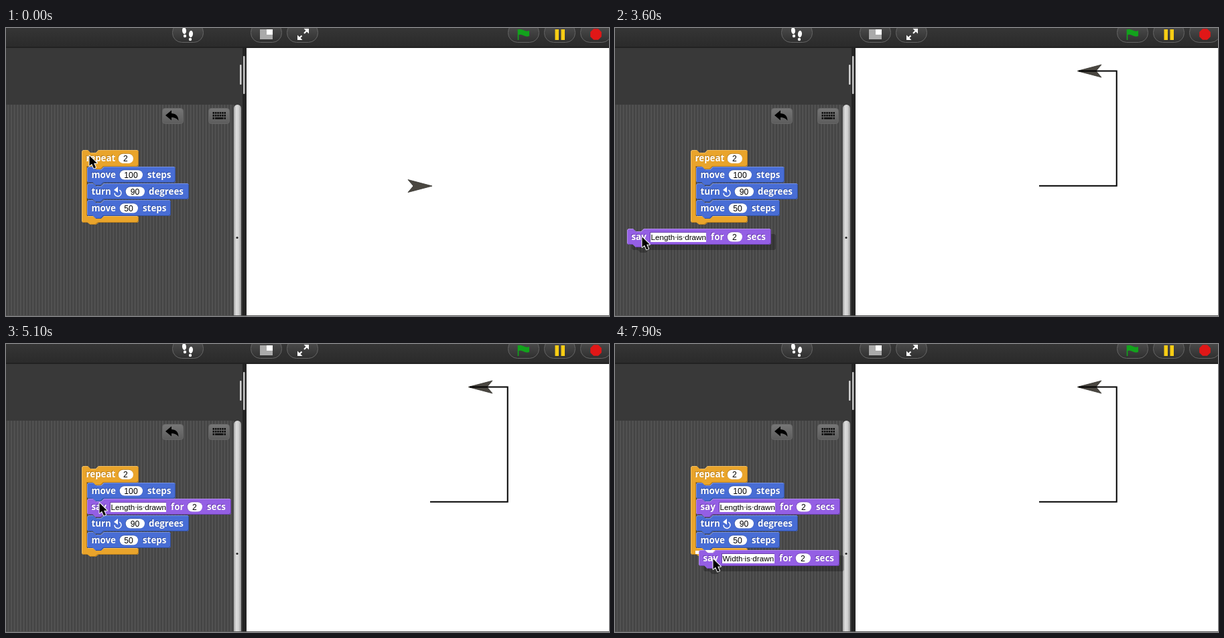
Recreate the animation shown at these times as an HTML page with a canvas. Size 900 by 432 pixels, loop 8 s.

```html
<!DOCTYPE html>
<html lang="en">
<head>
<meta charset="utf-8">
<title>Block script</title>
<style>
html, body { margin: 0; width: 900px; height: 432px; overflow: hidden; background: #333; }
canvas { display: block; }
</style>
</head>
<body>
<canvas id="view" width="900" height="432"></canvas>
<script>
const ctx = document.getElementById('view').getContext('2d');
const LOOP = 8000, STEP = 100;
const LABEL = '700 13.3px "Open Sans", "Noto Sans", sans-serif';
const INPUT = '11.7px "Liberation Sans", Arial, sans-serif';
const NUMBER = '12.2px "Liberation Sans", Arial, sans-serif';

const GOLD = { base: '#e9a42b', light: '#f3bd5c', dark: '#b67d1c' };
const BLUE = { base: '#486dd5', light: '#7691e2', dark: '#33509f' };
const PURPLE = { base: '#945fe4', light: '#b48df0', dark: '#6a3fae' };

// Block parts: [kind, x, text, width]
const REPEAT = { w: 85, skin: GOLD, parts: [['label', 6.5, 'repeat'], ['num', 54, '2', 23]] };
const MOVE100 = { w: 132, skin: BLUE, parts: [['label', 6.5, 'move'], ['num', 48, '100', 35], ['label', 90, 'steps']] };
const TURN = { w: 152, skin: BLUE, parts: [['label', 6.5, 'turn'], ['turn', 46], ['num', 57, '90', 29], ['label', 92, 'degrees']] };
const MOVE50 = { w: 125, skin: BLUE, parts: [['label', 6.5, 'move'], ['num', 48, '50', 28], ['label', 83, 'steps']] };
const say = (text, boxW) => ({
  w: boxW + 131, skin: PURPLE,
  parts: [['label', 6.5, 'say'], ['text', 34, text, boxW], ['label', boxW + 41, 'for'],
          ['num', boxW + 65, '2', 23], ['label', boxW + 95, 'secs']]
});
const SAY_LENGTH = say('Length is drawn', 84);
const SAY_WIDTH = say('Width is drawn', 79);

// Tracks: [time, x, y]
const POINTER = [
  [0, 124, 191], [2700, 124, 191], [2900, 20, 230], [3000, -30, 250], [3200, -30, 290],
  [3400, 10, 320], [3600, 40, 313], [3700, 42, 314], [4000, 118, 262], [4200, 139, 238],
  [6300, 139, 238], [6400, 60, 290], [6500, -20, 320], [6600, -10, 350], [6700, 26, 364],
  [6800, 60, 379], [7000, 193, 344], [7200, 154, 327], [7900, 146, 322]
];
const DRAG_LENGTH = [
  [3100, -240, 300], [3300, -120, 307], [3500, 5, 305], [3600, 18, 301],
  [3700, 20, 302], [4000, 98, 252], [4200, 121, 233], [4700, 121, 233]
];
const DRAG_WIDTH = [
  [6500, -260, 290], [6700, -164, 321], [6800, 20, 368], [7000, 171, 330],
  [7200, 132, 313], [7900, 125, 309], [8000, 125, 309]
];
const RUN = { start: 300, corner: 400, end: 500 }, DROP = 4700;

function at(track, t) {
  const i = track.findIndex(k => k[0] > t);
  if (i < 0) return track[track.length - 1].slice(1);
  if (i === 0) return track[0].slice(1);
  const [a, b] = [track[i - 1], track[i]];
  const u = (t - a[0]) / (b[0] - a[0]);
  return [a[1] + (b[1] - a[1]) * u, a[2] + (b[2] - a[2]) * u].map(Math.round);
}

function rect(x, y, w, h, fill) { ctx.fillStyle = fill; ctx.fillRect(x, y, w, h); }

function round(x, y, w, h, r, fill, stroke) {
  ctx.beginPath();
  ctx.roundRect(x, y, w, h, r);
  if (fill) { ctx.fillStyle = fill; ctx.fill(); }
  if (stroke) { ctx.strokeStyle = stroke; ctx.lineWidth = 1; ctx.stroke(); }
}

function poly(points, fill) {
  ctx.beginPath();
  points.forEach(p => ctx.lineTo(...p));
  ctx.closePath();
  if (fill) { ctx.fillStyle = fill; ctx.fill(); }
}

function fade(x0, y0, x1, y1, ...colors) {
  const g = ctx.createLinearGradient(x0, y0, x1, y1);
  colors.forEach((c, i) => g.addColorStop(i / (colors.length - 1), c));
  return g;
}

const notch = (x, y) => [[x + 9, y], [x + 13, y + 4], [x + 21, y + 4], [x + 25, y]];

function shape(points) {
  const p = new Path2D();
  points.forEach(q => p.lineTo(...q));
  p.closePath();
  return p;
}

function blockShape(x, y, w, h) {
  return shape([
    [x, y + 2], [x + 2, y], ...notch(x, y), [x + w - 2, y], [x + w, y + 2],
    [x + w, y + h - 2], [x + w - 2, y + h], ...notch(x, y + h).reverse(), [x + 2, y + h], [x, y + h - 2]
  ]);
}

function loopShape(x, y, w, base) {
  const head = y + 25, end = base + 10;
  return shape([
    [x, y + 2], [x + 2, y], ...notch(x, y), [x + w - 2, y], [x + w, y + 2],
    [x + w, head - 2], [x + w - 2, head], ...notch(x + 8, head).reverse(), [x + 8, head],
    [x + 8, base], [x + w - 2, base], [x + w, base + 2], [x + w, end - 2], [x + w - 2, end],
    ...notch(x, end).map(([px, py]) => [px, end + (py - end) * .75]).reverse(), [x + 2, end], [x, end - 2]
  ]);
}

function bevel(path, skin) {
  const moved = d => {
    const p = new Path2D();
    p.addPath(path, new DOMMatrix([1, 0, 0, 1, d, d]));
    return p;
  };
  ctx.save();
  ctx.fillStyle = skin.light;
  ctx.fill(path);
  ctx.clip(path);
  ctx.clip(moved(1));
  ctx.fillStyle = skin.dark;
  ctx.fill(path);
  ctx.clip(moved(-1));
  ctx.fillStyle = skin.base;
  ctx.fill(path);
  ctx.restore();
}

const draw = {
  label(x, y, text, w, skin) {
    ctx.font = LABEL;
    ctx.fillStyle = skin.dark;
    ctx.fillText(text, x - 1, y + 15.5);
    ctx.fillStyle = '#fff';
    ctx.fillText(text, x, y + 16.5);
  },
  num(x, y, text, w, skin) {
    round(x, y + 4.5, w, 15, 7.5, skin.dark);
    round(x + .7, y + 5.2, w - .7, 14.3, 7, '#fff');
    ctx.font = NUMBER;
    ctx.fillStyle = '#000';
    ctx.textAlign = 'center';
    ctx.fillText(text, x + w / 2, y + 16.5);
    ctx.textAlign = 'left';
  },
  text(x, y, text, w, skin) {
    rect(x, y + 5, w, 15, skin.dark);
    rect(x + 1, y + 6, w - 1, 14, '#fff');
    ctx.font = INPUT;
    ctx.fillStyle = '#000';
    ctx.fillText(text, x + 1.5, y + 16.5);
    [...text].forEach((c, i) => {
      if (c === ' ') rect(x + 2.5 + ctx.measureText(text.slice(0, i)).width, y + 12, 1.6, 1.6, '#777');
    });
  },
  turn(x, y) {
    ctx.strokeStyle = '#fff';
    ctx.lineWidth = 1.4;
    ctx.beginPath();
    ctx.arc(x, y + 14.5, 5, -1.1, Math.PI);
    ctx.stroke();
    poly([[x - 6, y + 10], [x, y + 5], [x, y + 14]], '#fff');
  }
};

function parts(block, x, y) {
  for (const [kind, dx, text, w] of block.parts) draw[kind](x + dx, y, text, w, block.skin);
}

function drawBlock(block, x, y, h = 24) {
  bevel(blockShape(x, y, block.w, h), block.skin);
  parts(block, x, y);
}

function dragBlock(block, x, y) {
  ctx.save();
  ctx.translate(7, 8);
  ctx.fillStyle = 'rgba(0,0,0,.26)';
  ctx.fill(blockShape(x, y, block.w, 24));
  ctx.restore();
  drawBlock(block, x, y);
}

function script(t) {
  const x = 113, y = 183, full = t >= DROP;
  const path = loopShape(x, y, REPEAT.w, full ? 306 : 282);
  const rows = full ? [[MOVE100, 208], [SAY_LENGTH, 232], [TURN, 257], [MOVE50, 282]]
                    : [[MOVE100, 208], [TURN, 233], [MOVE50, 258]];
  if (t >= RUN.start && t < RUN.end) {
    ctx.save();
    ctx.shadowColor = ctx.fillStyle = 'rgb(153,255,213)';
    ctx.shadowBlur = 11;
    for (let i = 0; i < 2; i++) {
      ctx.fill(path);
      rows.forEach(([b, top]) => ctx.fill(blockShape(x + 8, top, b.w, 24)));
    }
    ctx.restore();
  }
  bevel(path, REPEAT.skin);
  parts(REPEAT, x, y + .5);
  rows.slice().reverse().forEach(([b, top]) => drawBlock(b, x + 8, top));
}

function pill(x) {
  round(x + .5, -7.5, 46, 29, 14, fade(0, -6, 0, 21, '#505050', '#303030'), '#666');
}

function toolbar() {
  rect(0, 0, 900, 30, fade(0, 0, 0, 30, '#353535', '#2a2a2a'));
  rect(0, 28, 900, 2, '#222');
  [248, 365, 419, 749, 803, 857].forEach(pill);
  ctx.fillStyle = '#fff';
  for (const [x, y] of [[266, 4], [276, 9]]) {
    ctx.beginPath();
    ctx.ellipse(x, y, 3, 5, x < 270 ? -.1 : .1, 0, 7);
    ctx.ellipse(x + (x < 270 ? 1 : -1), y + 8, 2.2, 2.2, 0, 0, 7);
    ctx.fill();
  }
  rect(379, 2, 19, 15, '#aaa');
  rect(389, 2, 9, 8, '#fff');
  ctx.strokeStyle = '#fff';
  ctx.lineWidth = 2.2;
  ctx.beginPath();
  ctx.moveTo(437, 16); ctx.lineTo(441.5, 11.5);
  ctx.moveTo(445, 8); ctx.lineTo(449, 4);
  ctx.stroke();
  poly([[435, 18], [435, 10.5], [442.5, 18]], '#fff');
  poly([[452, 1], [444.5, 1], [452, 8.5]], '#fff');

  ctx.fillStyle = ctx.strokeStyle = '#12a31c';
  ctx.lineWidth = 1.6;
  ctx.beginPath();
  ctx.moveTo(764.5, 2); ctx.lineTo(764.5, 18);
  ctx.stroke();
  ctx.beginPath();
  ctx.moveTo(764, 3);
  ctx.bezierCurveTo(770, -1, 774, 7, 781, 4);
  ctx.lineTo(781, 12);
  ctx.bezierCurveTo(774, 15, 770, 7, 764, 11);
  ctx.fill();
  rect(819.5, 2, 5.5, 16, '#f8cd14');
  rect(828.5, 2, 5.5, 16, '#f8cd14');
  poly(Array.from({ length: 8 }, (_, i) => {
    const a = (i + .5) * Math.PI / 4;
    return [880.5 + 9 * Math.cos(a), 9.5 + 9 * Math.sin(a)];
  }), '#e01717');
}

function padButton(x) {
  round(x + .5, 120.5, 31, 23, 4, fade(0, 120, 0, 144, '#777', '#5c5c5c'), '#666');
}

function panels() {
  rect(0, 30, 359, 402, '#242424');
  rect(0, 30, 353, 85, '#393939');
  rect(0, 115, 353, 317, '#525252');
  for (let x = 0; x < 353; x += 4.613) rect(x, 115, 2.3, 317, '#444');
  rect(340, 115, 13, 317, '#383838');
  round(340, 115, 11, 330, [6, 6, 0, 0], fade(340, 0, 351, 0, '#a4a4a4', '#dedede', '#cfcfcf', '#959595'));
  ctx.fillStyle = '#222';
  ctx.beginPath();
  ctx.arc(345, 314.5, 1.6, 0, 7);
  ctx.fill();
  round(349, 55, 2.5, 30, 1, '#d0d0d0');
  round(354, 42, 2.5, 57, 1, '#c8c8c8');

  padButton(233);
  poly([[238, 131], [247, 123.5], [247, 138.5]], '#000');
  ctx.beginPath();
  ctx.moveTo(246, 128);
  ctx.quadraticCurveTo(257, 128, 257.5, 139);
  ctx.quadraticCurveTo(254, 134, 246, 134);
  ctx.fill();
  padButton(302);
  for (let r = 0; r < 2; r++)
    for (let i = 0; i < 6; i++) rect(308.5 + i * 3.4, 126 + r * 4, 2.5, 2.8, '#111');
  rect(308.5, 134, 2.5, 2.8, '#111');
  rect(312, 134, 12.5, 2.8, '#111');
  rect(325.5, 134, 2.5, 2.8, '#111');
}

function sprite(x, y, angle) {
  ctx.save();
  ctx.translate(x, y);
  ctx.rotate(angle);
  poly([[0, 0], [-36, -9.5], [-28, 0], [-36, 9.5]], '#4a4741');
  ctx.strokeStyle = '#33312d';
  ctx.lineWidth = .8;
  ctx.stroke();
  ctx.restore();
}

function stage(t) {
  rect(359, 30, 541, 401, '#fff');
  if (t < RUN.corner) return sprite(636, 237, 0);
  const done = t >= RUN.end;
  if (done) sprite(690, 64.5, Math.PI);
  else sprite(749, 179, -Math.PI / 2);
  ctx.strokeStyle = '#000';
  ctx.lineWidth = 2;
  ctx.beginPath();
  ctx.moveTo(633, 236.7);
  ctx.lineTo(748.7, 236.7);
  ctx.lineTo(748.7, done ? 64.5 : 180);
  if (done) ctx.lineTo(692, 64.5);
  ctx.stroke();
}

function pointer(x, y) {
  poly([[0, 0], [0, 17], [4, 13.5], [7.3, 21], [10.6, 19.6], [7.4, 12.4], [12.6, 12.4]]
    .map(([dx, dy]) => [x + .5 + dx * .9, y + .5 + dy * .9]));
  ctx.lineJoin = 'round';
  ctx.strokeStyle = '#fff';
  ctx.lineWidth = 2;
  ctx.stroke();
  ctx.fillStyle = '#000';
  ctx.fill();
  ctx.lineJoin = 'miter';
}

function render(t) {
  panels();
  stage(t);
  toolbar();
  rect(0, 431, 900, 1, '#555');
  script(t);
  if (t >= 3100 && t < DROP) {
    if (t >= 4100) rect(121, 231, 151, 2.5, '#fff');
    dragBlock(SAY_LENGTH, ...at(DRAG_LENGTH, t));
    if (t >= 4200) poly(notch(121, 233), '#fff');
  }
  if (t >= 6500) {
    if (t >= 7300) {
      rect(120, 310, 7, 5, '#fff');
      poly([[134, 309], [138, 313], [146, 313], [150, 309]], '#fff');
    }
    dragBlock(SAY_WIDTH, ...at(DRAG_WIDTH, t));
  }
  pointer(...at(POINTER, t));
}

const begin = performance.now();
function tick() {
  const t = (performance.now() - begin) % LOOP;
  render(Math.floor(t / STEP) * STEP);
  requestAnimationFrame(tick);
}
tick();
</script>
</body>
</html>
```
